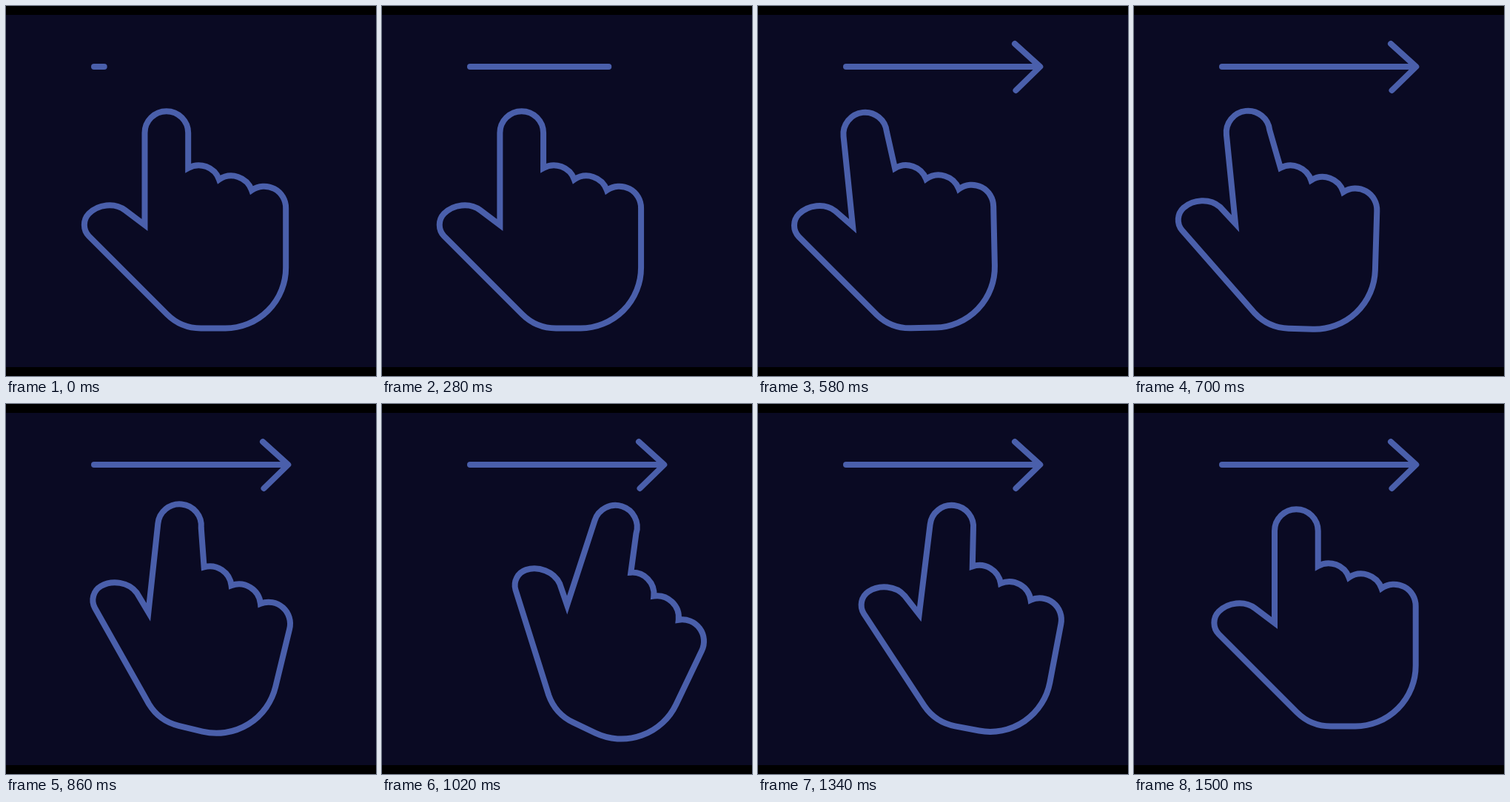
An HTML page for the animation above (2.22 s loop, 500 by 500 pixels).

```html
<!DOCTYPE html>
<html lang="en">
<head>
<meta charset="utf-8">
<title>Swipe right</title>
<style>
  html, body { margin: 0; height: 100%; overflow: hidden; background: #000; }
  svg { display: block; width: 100vw; height: 100vh; }
  path { fill: none; stroke: #4a5fab; stroke-width: 8; }
  .arrow { stroke-linecap: round; stroke-linejoin: round; }
</style>
</head>
<body>
<svg viewBox="0 0 500 500">
  <rect y="12" width="500" height="476" fill="#0a0a23"/>
  <path class="arrow" id="shaft" d="M119 82H378"/>
  <path class="arrow" id="head" d="M348.5 114L381.3 82L347 51"/>
  <path id="hand"/>
</svg>
<script>
const LOOP = 2220, STEP = 20;
// Phases of the swipe, in ms
const START = -25, CURL = 465, REACH = 650, PEAK = 1080, UNCURL = 1200, REST = 1485;
const SHAFT = 259;
const [shaft, head, hand] = ['shaft', 'head', 'hand'].map(id => document.getElementById(id));

// Progress from 0 to 1 between two times
const ramp = (ms, from, to) => Math.min(1, Math.max(0, (ms - from) / (to - from)));

// Returns a function that rotates a point about a joint
function joint(cx, cy, degrees) {
  const a = degrees * Math.PI / 180, cos = Math.cos(a), sin = Math.sin(a);
  return (x, y) => [cx + (x - cx) * cos - (y - cy) * sin,
                    cy + (x - cx) * sin + (y - cy) * cos];
}

function handPath(bend) {
  const finger = joint(219.3, 286, -8 * bend);
  const thumb = joint(220, 416.5, 2 * bend);
  const knuckle = 'A29.3 29.3 0 0 1';
  return `M190 296L${finger(190, 171.5)}${knuckle} ${finger(248.7, 171.5)}L248.7 219
    ${knuckle} 290.5 234.5 ${knuckle} 334.5 249 ${knuckle} 380.7 273.5
    V353.5A82 82 0 0 1 299 435.5H266A65 65 0 0 1 220 416.5
    L${thumb(114.5, 311)}A22 22 0 0 1 ${thumb(114.5, 280.5)}
    C${thumb(127, 268)} ${thumb(149, 265)} ${thumb(163.5, 276)}Z`;
}

function trim(path, length) {
  path.style.visibility = length > 0 ? 'visible' : 'hidden';
  path.setAttribute('stroke-dasharray', `${Math.max(length, 0)} 999`);
}

function draw(now) {
  const ms = Math.floor(now % LOOP / STEP) * STEP;
  const drawn = 13.7 + ms * 0.62;
  trim(shaft, drawn);
  trim(head, drawn - SHAFT);

  const curl = ramp(ms, CURL, REACH);
  const swing = ramp(ms, REACH, PEAK);
  const back = ramp(ms, PEAK, REST);
  const x = -67.8 * ramp(ms, START, REACH) + 112.3 * swing - 44.5 * back;
  const angle = -2 * curl + 32 * swing - 30 * back;
  hand.setAttribute('d', handPath(curl - ramp(ms, UNCURL, REST)));
  hand.setAttribute('transform', `translate(${x}) rotate(${angle} 259 353)`);
  requestAnimationFrame(draw);
}
draw(performance.now());
</script>
</body>
</html>
```
